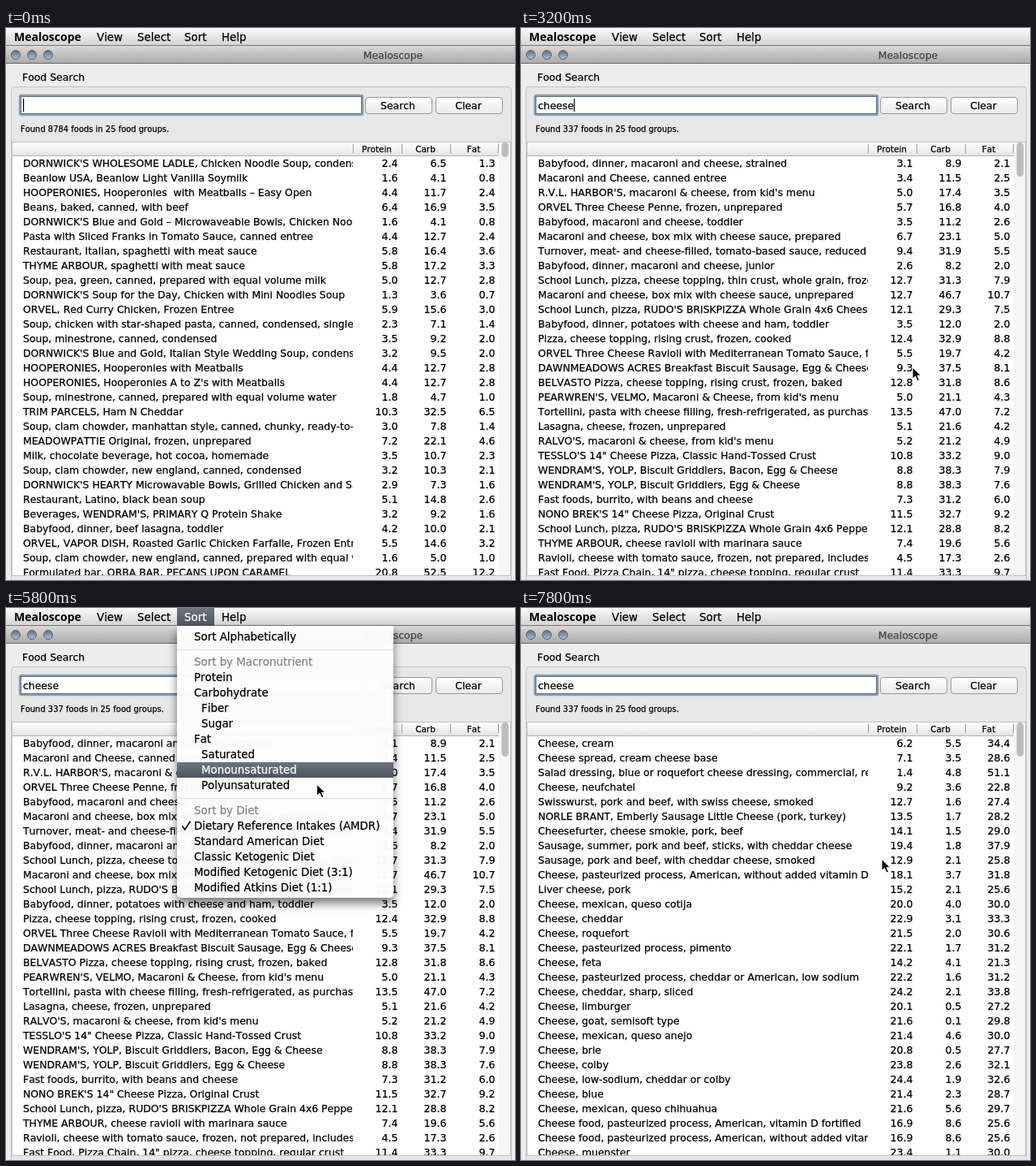
An HTML page that plays this animation: 628 by 680 pixels, repeating every 8 s.

```html
<!DOCTYPE html>
<html lang="en">
<head>
<meta charset="utf-8">
<title>Mealoscope</title>
<style>
  html, body { margin: 0; width: 100%; height: 100%; overflow: hidden; background: #ededed; }
  svg { display: block; width: 628px; height: 680px; }
  text {
    font: 12.45px "DejaVu Sans", sans-serif; font-kerning: none; white-space: pre;
    color: #000; fill: currentColor; stroke: currentColor; stroke-width: .25px;
  }
  .bar text, .menu text { font-size: 13.36px; }
  .bar .app { font: bold 14px "Noto Sans", sans-serif; stroke: none; }
  .head text { font-size: 10.45px; text-anchor: middle; }
  .num { text-anchor: end; font-size: 12.6px; }
  .mid { text-anchor: middle; }
  .title { color: #444; }
  #found { font-size: 9.95px; }
  .menu text.group { color: #858585; }
  .menu text.on, .bar text.on { color: #fff; }
</style>
</head>
<body>
<svg viewBox="0 0 628 680">
  <defs>
    <linearGradient id="barFill" x2="0" y2="1"><stop stop-color="#fbfbfb"/><stop offset="1" stop-color="#d2d2d2"/></linearGradient>
    <linearGradient id="titleFill" x2="0" y2="1"><stop stop-color="#d9d9d9"/><stop offset="1" stop-color="#a9a9a9"/></linearGradient>
    <linearGradient id="btnFill" x2="0" y2="1"><stop stop-color="#fff"/><stop offset=".5" stop-color="#f4f4f4"/><stop offset="1" stop-color="#ebebeb"/></linearGradient>
    <linearGradient id="headFill" x2="0" y2="1"><stop stop-color="#fff"/><stop offset=".5" stop-color="#f3f3f3"/><stop offset="1" stop-color="#e2e2e2"/></linearGradient>
    <linearGradient id="hotFill" x2="0" y2="1"><stop stop-color="#70747d"/><stop offset="1" stop-color="#4e525c"/></linearGradient>
    <linearGradient id="lampFill" x2="0" y2="1"><stop stop-color="#626b78"/><stop offset="1" stop-color="#b4bfcc"/></linearGradient>
    <clipPath id="nameClip"><path d="M8 158H428V674H8z"/></clipPath>
    <clipPath id="rowClip"><path d="M8 158H608V674H8z"/></clipPath>
    <filter id="shadow" x="-15%" y="-10%" width="130%" height="125%"><feDropShadow dx="0" dy="7" stdDeviation="6" flood-opacity=".55"/></filter>
  </defs>

  <rect width="628" height="680" fill="#ededed"/>
  <rect y="22" width="628" height="22" fill="url(#titleFill)"/>
  <path d="M0 43.5H628" stroke="#6a6a6a"/>
  <g id="lamps" fill="url(#lampFill)" stroke="#5d6570"></g>
  <text class="mid title" x="477.5" y="38">Mealoscope</text>
  <text x="20" y="65">Food Search</text>

  <rect x="6.5" y="72.5" width="617" height="620" rx="4" fill="#e7e7e7" stroke="#c4c4c4"/>
  <rect x="17" y="83" width="423" height="24" rx="2" fill="#fff" stroke="#8f9bab" stroke-width="2.5"/>
  <rect x="18.5" y="84.5" width="420" height="21" fill="#fff" stroke="#62707f"/>
  <text id="query" x="21" y="100"></text>
  <rect id="caret" y="87" width="1.2" height="16"/>
  <g fill="url(#btnFill)" stroke="#989898">
    <rect x="443.5" y="85.5" width="82" height="20" rx="3.5"/>
    <rect x="530.5" y="85.5" width="82" height="20" rx="3.5"/>
  </g>
  <text class="mid" x="483.5" y="100">Search</text>
  <text class="mid" x="570.5" y="100">Clear</text>
  <text id="found" x="18" y="128"></text>

  <rect x="7.5" y="140.5" width="615" height="534" fill="#fff" stroke="#c2c2c2"/>
  <rect x="608" y="141" width="14" height="533" fill="#f6f6f6"/>
  <rect id="thumb" x="611.5" y="141" width="8.5" rx="4.2" fill="#bdbdbd"/>
  <g class="head">
    <rect x="8" y="141" width="600" height="16" fill="url(#headFill)"/>
    <path d="M8 157.5H608" stroke="#b4b4b4"/>
    <path d="M428.5 143V154M488.5 143V154M548.5 143V154M607.5 143V154" stroke="#9c9c9c"/>
    <text x="457.5" y="153">Protein</text><text x="517.5" y="153">Carb</text><text x="577" y="153">Fat</text>
  </g>
  <g id="tables" clip-path="url(#rowClip)"></g>

  <g class="bar">
    <rect width="628" height="22" fill="url(#barFill)"/>
    <path d="M0 21.5H628" stroke="#777"/>
    <rect id="sortHot" x="211" width="46" height="22" fill="url(#hotFill)"/>
    <text class="app" x="10" y="16">Mealoscope</text>
    <text x="112" y="16">View</text><text x="162" y="16">Select</text>
    <text id="sortName" x="220" y="16">Sort</text><text x="266" y="16">Help</text>
  </g>
  <g id="menu" class="menu">
    <path d="M211 22H478V352a5 5 0 0 1-5 5H216a5 5 0 0 1-5-5z" fill="#fff" fill-opacity=".95" filter="url(#shadow)"/>
    <path d="M211 51.5H478M211 234.5H478" stroke="#dcdcdc"/>
    <rect id="hot" x="211" width="267" height="19" fill="url(#hotFill)"/>
    <path d="M217.5 268.5l3.2 4.5L227.5 262.5" fill="none" stroke="#111" stroke-width="1.7"/>
    <g id="items"></g>
  </g>
  <g id="ring" fill="none">
    <circle r="20.5" stroke="#fff" stroke-opacity=".75" stroke-width="6"/>
    <circle r="20.5" stroke="#000" stroke-width="3"/>
  </g>
  <path id="pointer" d="M0 0V15L3.5 11.8 6 17.3 8.7 16.1 6.3 10.8H11z" stroke="#fff" stroke-width="1.2"/>
</svg>
<script>
const $ = id => document.getElementById(id);
const esc = s => s.replace(/&/g, '&amp;');

const allFoods = `DORNWICK'S WHOLESOME LADLE, Chicken Noodle Soup, condensed|2.4|6.5|1.3
Beanlow USA, Beanlow Light Vanilla Soymilk|1.6|4.1|0.8
HOOPERONIES, Hooperonies  with Meatballs – Easy Open|4.4|11.7|2.4
Beans, baked, canned, with beef|6.4|16.9|3.5
DORNWICK'S Blue and Gold – Microwaveable Bowls, Chicken Noodle|1.6|4.1|0.8
Pasta with Sliced Franks in Tomato Sauce, canned entree|4.4|12.7|2.4
Restaurant, Italian, spaghetti with meat sauce|5.8|16.4|3.6
THYME ARBOUR, spaghetti with meat sauce|5.8|17.2|3.3
Soup, pea, green, canned, prepared with equal volume milk|5.0|12.7|2.8
DORNWICK'S Soup for the Day, Chicken with Mini Noodles Soup|1.3|3.6|0.7
ORVEL, Red Curry Chicken, Frozen Entree|5.9|15.6|3.0
Soup, chicken with star-shaped pasta, canned, condensed, single|2.3|7.1|1.4
Soup, minestrone, canned, condensed|3.5|9.2|2.0
DORNWICK'S Blue and Gold, Italian Style Wedding Soup, condensed|3.2|9.5|2.0
HOOPERONIES, Hooperonies with Meatballs|4.4|12.7|2.8
HOOPERONIES, Hooperonies A to Z's with Meatballs|4.4|12.7|2.8
Soup, minestrone, canned, prepared with equal volume water|1.8|4.7|1.0
TRIM PARCELS, Ham N Cheddar|10.3|32.5|6.5
Soup, clam chowder, manhattan style, canned, chunky, ready-to-|3.0|7.8|1.4
MEADOWPATTIE Original, frozen, unprepared|7.2|22.1|4.6
Milk, chocolate beverage, hot cocoa, homemade|3.5|10.7|2.3
Soup, clam chowder, new england, canned, condensed|3.2|10.3|2.1
DORNWICK'S HEARTY Microwavable Bowls, Grilled Chicken and Sausage|2.9|7.3|1.6
Restaurant, Latino, black bean soup|5.1|14.8|2.6
Beverages, WENDRAM'S, PRIMARY Q Protein Shake|3.2|9.2|1.6
Babyfood, dinner, beef lasagna, toddler|4.2|10.0|2.1
ORVEL, VAPOR DISH, Roasted Garlic Chicken Farfalle, Frozen Entree|5.5|14.6|3.2
Soup, clam chowder, new england, canned, prepared with equal volume|1.6|5.0|1.0
Formulated bar, ORBA BAR, PECANS UPON CARAMEL|20.8|52.5|12.2`;

const cheeseFoods = `Babyfood, dinner, macaroni and cheese, strained|3.1|8.9|2.1
Macaroni and Cheese, canned entree|3.4|11.5|2.5
R.V.L. HARBOR'S, macaroni & cheese, from kid's menu|5.0|17.4|3.5
ORVEL Three Cheese Penne, frozen, unprepared|5.7|16.8|4.0
Babyfood, macaroni and cheese, toddler|3.5|11.2|2.6
Macaroni and cheese, box mix with cheese sauce, prepared|6.7|23.1|5.0
Turnover, meat- and cheese-filled, tomato-based sauce, reduced|9.4|31.9|5.5
Babyfood, dinner, macaroni and cheese, junior|2.6|8.2|2.0
School Lunch, pizza, cheese topping, thin crust, whole grain, frozen|12.7|31.3|7.9
Macaroni and cheese, box mix with cheese sauce, unprepared|12.7|46.7|10.7
School Lunch, pizza, RUDO'S BRISKPIZZA Whole Grain 4x6 Cheese|12.1|29.3|7.5
Babyfood, dinner, potatoes with cheese and ham, toddler|3.5|12.0|2.0
Pizza, cheese topping, rising crust, frozen, cooked|12.4|32.9|8.8
ORVEL Three Cheese Ravioli with Mediterranean Tomato Sauce, frozen|5.5|19.7|4.2
DAWNMEADOWS ACRES Breakfast Biscuit Sausage, Egg & Cheese, frozen|9.3|37.5|8.1
BELVASTO Pizza, cheese topping, rising crust, frozen, baked|12.8|31.8|8.6
PEARWREN'S, VELMO, Macaroni & Cheese, from kid's menu|5.0|21.1|4.3
Tortellini, pasta with cheese filling, fresh-refrigerated, as purchased|13.5|47.0|7.2
Lasagna, cheese, frozen, unprepared|5.1|21.6|4.2
RALVO'S, macaroni & cheese, from kid's menu|5.2|21.2|4.9
TESSLO'S 14" Cheese Pizza, Classic Hand-Tossed Crust|10.8|33.2|9.0
WENDRAM'S, YOLP, Biscuit Griddlers, Bacon, Egg & Cheese|8.8|38.3|7.9
WENDRAM'S, YOLP, Biscuit Griddlers, Egg & Cheese|8.8|38.3|7.6
Fast foods, burrito, with beans and cheese|7.3|31.2|6.0
NONO BREK'S 14" Cheese Pizza, Original Crust|11.5|32.7|9.2
School Lunch, pizza, RUDO'S BRISKPIZZA Whole Grain 4x6 Pepperoni|12.1|28.8|8.2
THYME ARBOUR, cheese ravioli with marinara sauce|7.4|19.6|5.6
Ravioli, cheese with tomato sauce, frozen, not prepared, includes|4.5|17.3|2.6
Fast Food, Pizza Chain, 14" pizza, cheese topping, regular crust|11.4|33.3|9.7`;

const ketoFoods = `Cheese, cream|6.2|5.5|34.4
Cheese spread, cream cheese base|7.1|3.5|28.6
Salad dressing, blue or roquefort cheese dressing, commercial, regular|1.4|4.8|51.1
Cheese, neufchatel|9.2|3.6|22.8
Swisswurst, pork and beef, with swiss cheese, smoked|12.7|1.6|27.4
NORLE BRANT, Emberly Sausage Little Cheese (pork, turkey)|13.5|1.7|28.2
Cheesefurter, cheese smokie, pork, beef|14.1|1.5|29.0
Sausage, summer, pork and beef, sticks, with cheddar cheese|19.4|1.8|37.9
Sausage, pork and beef, with cheddar cheese, smoked|12.9|2.1|25.8
Cheese, pasteurized process, American, without added vitamin D|18.1|3.7|31.8
Liver cheese, pork|15.2|2.1|25.6
Cheese, mexican, queso cotija|20.0|4.0|30.0
Cheese, cheddar|22.9|3.1|33.3
Cheese, roquefort|21.5|2.0|30.6
Cheese, pasteurized process, pimento|22.1|1.7|31.2
Cheese, feta|14.2|4.1|21.3
Cheese, pasteurized process, cheddar or American, low sodium|22.2|1.6|31.2
Cheese, cheddar, sharp, sliced|24.2|2.1|33.8
Cheese, limburger|20.1|0.5|27.2
Cheese, goat, semisoft type|21.6|0.1|29.8
Cheese, mexican, queso anejo|21.4|4.6|30.0
Cheese, brie|20.8|0.5|27.7
Cheese, colby|23.8|2.6|32.1
Cheese, low-sodium, cheddar or colby|24.4|1.9|32.6
Cheese, blue|21.4|2.3|28.7
Cheese, mexican, queso chihuahua|21.6|5.6|29.7
Cheese food, pasteurized process, American, vitamin D fortified|16.9|8.6|25.6
Cheese food, pasteurized process, American, without added vitamin D|16.9|8.6|25.6
Cheese, muenster|23.4|1.1|30.0`;

// Menu lines: label, centre y, indent; a leading # marks a group heading.
const items = [
  ['Sort Alphabetically', 35], ['#Sort by Macronutrient', 66], ['Protein', 85], ['Carbohydrate', 104],
  ['Fiber', 123, 9], ['Sugar', 142, 9], ['Fat', 161], ['Saturated', 180, 9], ['Monounsaturated', 199, 9],
  ['Polyunsaturated', 218, 9], ['#Sort by Diet', 249], ['Dietary Reference Intakes (AMDR)', 268],
  ['Standard American Diet', 287], ['Classic Ketogenic Diet', 306],
  ['Modified Ketogenic Diet (3:1)', 325], ['Modified Atkins Diet (1:1)', 344]
];

const row = (line, i) => {
  const [name, ...nums] = line.split('|'), y = 171 + 18 * i;
  return `<text x="21" y="${y}" clip-path="url(#nameClip)">${esc(name)}</text>` +
    nums.map((n, k) => `<text class="num" x="${483.5 + 60 * k}" y="${y}">${n}</text>`).join('');
};
$('tables').innerHTML = [allFoods, cheeseFoods, ketoFoods]
  .map(list => `<g>${list.split('\n').map(row).join('')}</g>`).join('');
$('lamps').innerHTML = [12, 32, 52].map(x => `<circle cx="${x}" cy="33" r="5.5"/>`).join('');
$('items').innerHTML = items.map(([label, y, dx = 0]) =>
  `<text class="${label[0] === '#' ? 'group' : ''}" x="${232 + dx}" y="${y + 5}">${label.replace('#', '')}</text>`).join('');

const LOOP = 8000, STEP = 200;
const path = [[2600, 640, 690], [4000, 241, -2], [4200, 241, -2], [4400, 236, 8],
  [4800, 236, 8], [5200, 270, 47], [6200, 445, 309]];

function pointerAt(t) {
  const i = path.findIndex(p => p[0] > t);
  if (i === 0) return path[0].slice(1);
  if (i < 0) return path[path.length - 1].slice(1);
  const [t0, x0, y0] = path[i - 1], [t1, x1, y1] = path[i];
  const u = (t - t0) / (t1 - t0), e = u * u * (3 - 2 * u);
  return [x0 + (x1 - x0) * e, y0 + (y1 - y0) * e];
}

const show = (el, on) => el.setAttribute('display', on ? 'inline' : 'none');
const within = (t, a, b) => t >= a && t < b;

function render(t) {
  const typed = Math.max(0, Math.min(6, Math.floor((t - 200) / 200)));
  $('query').textContent = 'cheese'.slice(0, typed);
  $('caret').setAttribute('x', 21 + (typed ? $('query').getComputedTextLength() : 0));
  show($('caret'), t < 1600 || (t < 4600 && t % 1000 < 500));

  const count = t < 1800 ? 8784 : t < 2600 ? 111 : 337;
  $('found').textContent = `Found ${count} foods in 25 food groups.`;
  $('thumb').setAttribute('height', { 8784: 18, 111: 133, 337: 42 }[count]);
  const shown = t < 1800 ? 0 : t < 7400 ? 1 : 2;
  [...$('tables').children].forEach((g, i) => show(g, i === shown));

  const sorting = within(t, 4400, 7200);
  show($('sortHot'), sorting);
  $('sortName').classList.toggle('on', sorting);

  // The highlight trails the pointer slightly.
  const hoverY = pointerAt(t - 70)[1];
  const hot = items.findIndex(([label, y]) => label[0] !== '#' && Math.abs(hoverY - y) <= 9.5);
  show($('menu'), within(t, 4600, 7000));
  show($('hot'), hot >= 0);
  if (hot >= 0) $('hot').setAttribute('y', items[hot][1] - 9);
  [...$('items').children].forEach((el, i) => el.classList.toggle('on', i === hot));

  const [x, y] = pointerAt(t);
  show($('pointer'), t >= 2600);
  $('pointer').setAttribute('transform', `translate(${x} ${y})`);
  show($('ring'), within(t, 4400, 4600) || within(t, 6400, 6800));
  $('ring').setAttribute('transform', `translate(${x + 1} ${y + 2})`);
}

let last = -1;
function tick() {
  const t = Math.floor(performance.now() % LOOP / STEP) * STEP;
  if (t !== last) render(last = t);
  requestAnimationFrame(tick);
}
tick();
</script>
</body>
</html>
```
